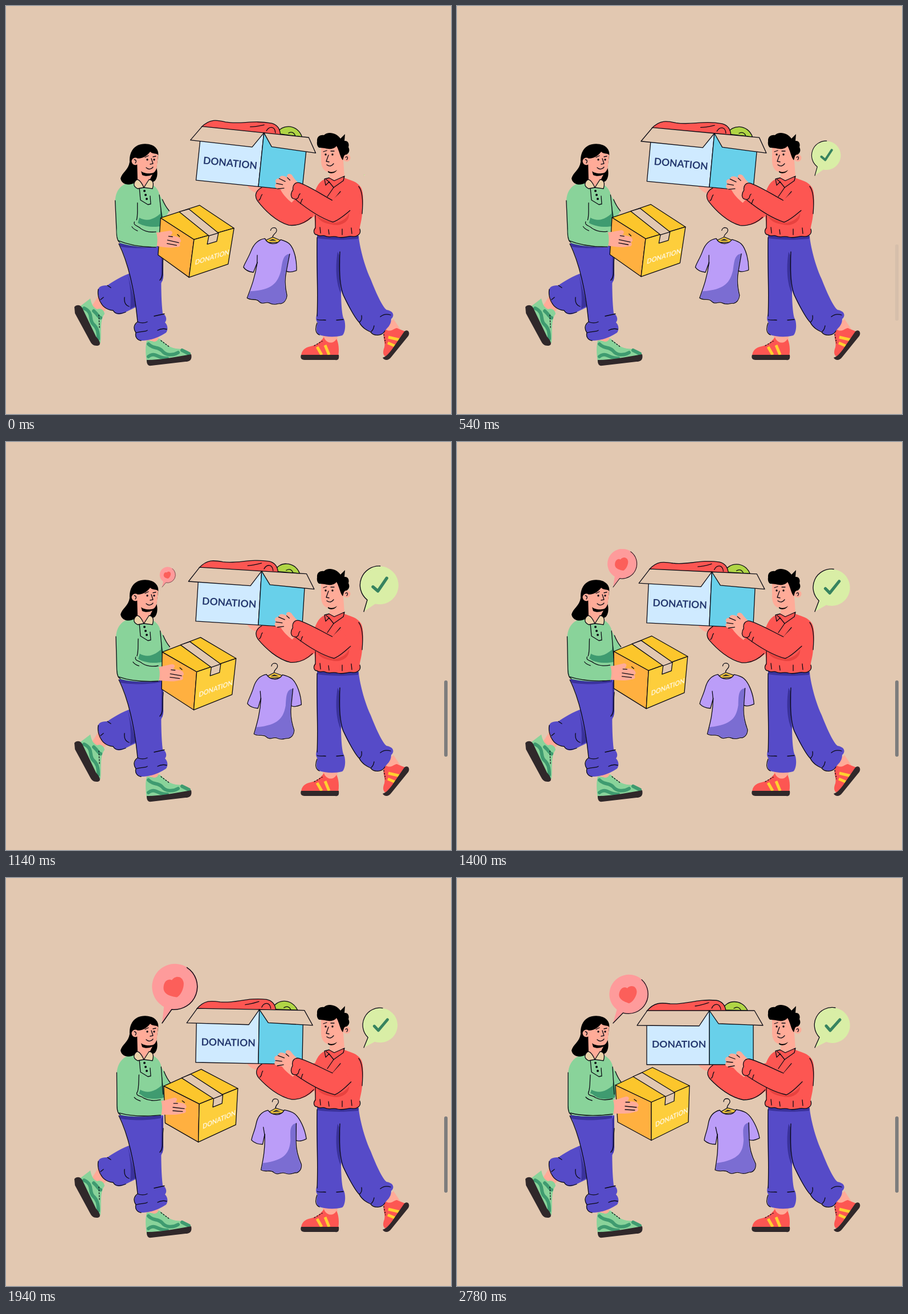
Animation, 781 px wide and 717 px high, one loop 2880 ms. Source, as an HTML page:

```html
<!DOCTYPE html>
<html lang="en">
<head>
<meta charset="utf-8">
<title>Donation</title>
<style>
html, body { margin: 0; width: 100%; height: 100%; overflow: hidden; background: #e2c8b1; }
svg { display: block; width: 781px; height: 717px; }
path, line { stroke-linecap: round; stroke-linejoin: round; }
.ink { fill: none; stroke: #0b0b14; stroke-width: 1.3; }
.edge { stroke: #0b0b14; stroke-width: 1.3; }
.skin { fill: #ffab98; }
.green { fill: #89d39a; }
.shade { fill: #3f9b70; }
.red { fill: #fd5652; }
.pants { fill: #564bc8; }
.navy { fill: #3a329c; }
.sole { fill: #30282a; }
.tan { fill: #e2c8b1; }
.band { fill: none; stroke: #3f9b70; stroke-width: 6; }
.stripe { fill: none; stroke: #ffd02f; stroke-width: 5; stroke-linecap: butt; }
text { font-family: Lato, "Open Sans", sans-serif; font-weight: 700; }
</style>
</head>
<body>
<svg viewBox="0 0 781 717">
  <!-- woman: legs and shoes -->
  <path class="skin" d="M163 508L176 533 162 546 149 530ZM246 580L267 577 269 602 247 602Z"/>
  <path class="green" d="M131 527L148 514C150 524 153 530 160 533 166 530 172 534 173 541 164 552 168 575 166 592L157 590Z"/>
  <path class="band" d="M137 531C154 539 145 551 153 559 160 565 162 572 162 585M154 536C162 543 162 547 166 548"/>
  <path class="sole" d="M120 529C124 524 131 525 134 531L158 581C166 590 168 597 159 597 153 597 150 594 147 588L121 540Z"/>
  <path class="green" d="M247 588C254 585 262 596 268 584 276 588 284 600 298 602 314 603 324 606 325 616L247 626C245 612 244 600 247 588Z"/>
  <path class="band" d="M250 594C258 603 267 598 274 606 280 614 292 615 302 609M250 616C261 607 268 620 283 619M309 605L321 611"/>
  <path class="sole" d="M247 622C275 622 300 616 325 612 327 621 323 625 315 625L255 632C248 633 247 628 247 622Z"/>
  <path class="ink" stroke-dasharray="2 3" d="M272 588L288 600M163 543L164 565"/>
  <path class="pants" d="M222 468C204 474 186 485 178 491 166 490 159 495 162 506 163 514 166 520 168 524 172 532 184 535 188 535 192 544 202 543 210 538 226 530 240 525 252 508 268 494 278 485 276 470L276 417 230 420Z"/>
  <path class="navy" d="M214 472L228 527 218 532C220 512 218 492 214 472ZM270 428C266 456 268 480 274 484L276 470 276 417Z"/>
  <path class="pants" d="M198 417L272 416C274 440 270 500 275 540 283 545 282 553 279 556 285 562 284 570 281 574 268 583 250 589 236 588 228 586 226 580 228 575 223 567 225 560 231 556 226 510 216 450 198 417Z"/>
  <path class="ink" d="M198 418C214 450 226 500 231 555C224 560 223 567 228 574 226 581 230 587 237 588M231 555C238 558 244 557 248 555M260 545L278 541M229 574C238 571 244 573 248 570M266 570C273 566 278 567 282 568M162 498C160 508 164 519 168 524 173 532 183 535 188 535 192 543 202 541 210 538M178 491L184 495M208 512C207 520 210 526 216 528M276 440C273 468 278 471 270 482M166 516L171 512"/>
  <path class="navy" d="M198 417L272 416 272 422C245 427 218 426 201 423Z"/>

  <!-- woman: torso and head -->
  <g id="torso">
    <path class="green" d="M262 318C273 325 279 346 289 360L274 386Z"/>
    <path class="ink" d="M278 340C281 348 285 355 289 360"/>
    <path class="green" d="M226 309C206 313 196 324 195 345L194 398C194 410 196 416 205 417 225 420 250 419 274 417L277 386 273 330C271 320 263 314 256 310Z"/>
    <path class="shade" d="M236 372C248 379 260 376 273 365L275 350C275 365 280 376 277 386 262 390 243 388 233 381Z"/>
    <path class="ink" d="M273 332L276 380M234 346C233 358 234 368 231 376M195 342L195 400C195 409 197 415 201 416"/>
  </g>
  <path class="ink" d="M234 319L236 341 249 349 254 348 253 334"/>
  <path fill="#000" d="M267 264C270 246 251 240 237 243 222 246 216 260 217 274 215 288 204 292 201 303 203 314 216 317 227 310L258 309C266 307 267 292 264 284Z"/>
  <circle class="skin" cx="227" cy="273" r="6.5"/>
  <path class="skin" d="M230 268C244 268 250 260 253 256 258 261 265 258 267 262L265 280C264 290 260 294 254 294 247 295 240 293 237 290L239 297C245 300 252 299 257 296L252 306 241 319 231 308Z"/>
  <path class="edge" fill="#ebd2aa" d="M226 309C230 301 236 306 242 319L231 321C225 318 223 314 226 309ZM242 319L251 305C258 305 260 312 257 321Z"/>
  <path class="ink" d="M225 270C229 270 229 274 227 276M244 266L250 263M258 265L263 264M255 268L258 277 253 278M246 284C250 288 255 287 258 283"/>
  <g fill="#0b0b14"><circle cx="248" cy="270" r="1.7"/><circle cx="260" cy="270" r="1.7"/><circle cx="243" cy="325" r="2"/><circle cx="245" cy="332" r="2"/><circle cx="247" cy="339" r="2"/></g>

  <!-- yellow box -->
  <g id="parcel">
    <path class="edge" fill="#fcc62c" d="M343 333L408 365 341 394 278 364Z"/>
    <path class="edge" fill="#ffb040" d="M278 364L341 394 341 461 282 429Z"/>
    <path class="edge" fill="#fdce3c" d="M341 394L408 365 406 429 341 461Z"/>
    <path class="edge tan" d="M309 349L325 342 382 377 381 392 365 399 366 384Z"/>
    <path class="ink" d="M366 384L382 377"/>
    <text transform="matrix(.85 -.39 0 1 348 438)" font-size="12.4" fill="#fff6dc">DONATION</text>
    <path class="skin" d="M270 391C280 390 289 386 297 384 303 384 303 389 299 392 306 393 312 392 316 395 320 399 319 402 316 403 320 407 318 411 312 411 302 415 290 414 270 414Z"/>
    <path class="ink" d="M296 394L303 394M295 401L315 403M295 407L312 408M311 389L315 392"/>
  </g>
  <g id="forearm">
    <path class="green" d="M199 385C210 377 231 375 238 380 248 389 262 391 273 388 277 396 276 407 274 415 250 419 220 420 204 417 196 410 195 395 199 385Z"/>
    <path class="ink" d="M231 376C228 383 239 382 243 386 253 391 265 390 273 388M226 385C229 389 233 390 237 391M199 413C215 417 242 419 273 415"/>
  </g>

  <!-- blue box and far arm -->
  <g id="crate">
    <path class="skin" d="M423 328C430 338 440 340 448 341L456 327Z"/>
    <path class="red" d="M449 328C438 336 438 346 444 353 458 368 480 386 503 390 522 390 534 382 545 370L548 324 520 330Z"/>
    <path class="skin" d="M482 329L520 329 504 350C495 344 488 338 482 329Z"/>
    <path class="ink" d="M449 329C438 336 438 346 444 353 458 368 480 386 503 390 520 390 532 382 541 372M446 352C450 350 448 345 451 341"/>
    <path class="edge" fill="#b0d545" d="M466 232C471 214 500 211 510 233Z"/>
    <path class="ink" d="M486 229C492 225 496 228 498 232"/>
    <path class="edge red" d="M333 234C346 218 358 219 374 221 402 223 420 212 455 215 467 217 471 226 472 234Z"/>
    <path class="ink" d="M447 229C451 220 461 219 463 231M418 225C428 224 436 221 442 219"/>
    <path class="edge" fill="#cfeaff" d="M333 250L443 233 443 328 333 328Z"/>
    <path class="edge" fill="#68d0ea" d="M443 233L520 250 520 328 443 328Z"/>
    <path class="edge tan" d="M334 233L443 233 425 260 316 259ZM443 233L522 233 537 259 459 256Z"/>
    <text x="342" y="298" font-size="17.5" fill="#24386e">DONATION</text>
  </g>

  <!-- man: legs and shoes -->
  <path class="skin" d="M556 576L582 576 581 600 556 596ZM663 566L680 550 692 568 670 582Z"/>
  <path class="red" d="M558 582C552 590 545 596 535 598 524 600 518 606 518 616L583 616C585 605 584 592 580 585 574 596 561 592 558 582ZM666 568C676 576 684 562 688 567L701 572C696 590 682 605 672 616 662 618 660 610 664 600 667 590 658 580 666 568Z"/>
  <path class="stripe" d="M546 599L554 613M560 596L567 613M671 582L692 587M670 592L684 598"/>
  <path class="ink" stroke-dasharray="2 3" d="M541 597L555 589M663 577L666 592"/>
  <path class="sole" d="M518 613L584 613C585 620 583 623 578 622L524 622C518 622 516 618 518 613ZM699 572C705 567 710 574 706 580L676 617C671 624 664 623 661 618 668 616 672 610 677 604Z"/>
  <path class="pants" d="M546 403L619 404C619 412 626 450 640 480 653 513 662 530 668 534 681 536 682 545 676 550 676 562 668 566 665 571 660 580 645 580 640 572 632 570 622 562 620 556 606 540 594 515 588 500 588 525 590 542 592 548 597 555 596 575 590 579 575 583 560 581 550 578 543 574 544 564 547 557 542 550 545 545 546 540 547 500 544 450 546 403Z"/>
  <path class="navy" d="M582 432C577 462 580 490 588 506 584 480 588 462 586 440ZM546 403L619 404 618 409C590 412 566 411 546 408Z"/>
  <path class="ink" d="M546 407C545 455 548 500 546 545M586 432C584 470 586 492 592 508 600 524 610 546 620 556 625 566 634 570 640 573 646 581 660 580 665 571M546 551C552 553 557 551 561 552M580 552L592 551M546 557C542 567 543 575 550 578M620 556C624 553 625 549 624 544M641 572C645 569 645 566 646 562M657 546C663 541 669 541 675 543"/>

  <!-- man: torso and head -->
  <path class="red" d="M558 305C548 310 543 320 538 340L543 388C538 394 540 402 546 402 550 406 556 402 560 404 566 408 574 403 582 406 592 409 602 403 608 405 616 406 624 401 621 392 620 388 624 380 625 365 628 340 627 326 623 319 616 308 606 307 594 302Z"/>
  <path fill="#e8423f" d="M546 369C558 376 568 380 578 381 592 379 600 370 602 364 604 380 586 388 572 384 560 382 550 379 546 369Z"/>
  <path class="ink" d="M543 368L543 390C538 396 541 402 546 402 550 406 556 402 560 404 566 408 574 403 582 406 592 409 602 403 608 405 616 406 624 401 621 392M551 389L552 399M566 393L567 401M590 392L590 402M606 390L607 400M619 317C626 326 627 342 625 365"/>
  <path class="skin" d="M553 248L553 274C554 286 560 292 569 292L567 303 575 318 594 300 592 272 584 244Z"/>
  <circle class="skin" cx="598" cy="267" r="6.5"/>
  <path d="M565 290C570 293 577 292 581 288 577 295 569 295 565 292Z"/>
  <path d="M551 249C547 249 545 243 546 238 545 229 552 226 558 227 564 220 580 222 587 233L595 225 594 237C600 236 603 242 601 248 604 254 602 258 598 261 592 261 593 267 591 271 586 265 585 254 580 246 576 252 566 252 560 250Z"/>
  <path class="edge red" d="M559 304L561 315 567 309 575 319 592 307 594 299 576 307 567 302Z"/>
  <path class="ink" d="M567 309L562 305M575 319L564 335M587 326L574 342M557 256L563 254M570 255L576 255M566 262L562 273 567 274M563 279C568 283 572 281 575 277M596 266C599 263 601 267 598 270"/>
  <g fill="#0b0b14"><circle cx="561" cy="261" r="1.7"/><circle cx="573" cy="261" r="1.7"/></g>
  <g id="arm">
    <path class="skin" d="M508 346C495 339 488 332 476 332 470 331 470 325 473 323 469 319 471 314 477 314 477 308 484 307 491 311 488 305 494 302 499 306 503 311 507 316 513 319Z"/>
    <path class="ink" d="M473 323L484 324M477 314L488 318M491 311L496 315M476 332L487 330"/>
    <path class="red" d="M513 318C505 317 501 324 503 331 498 340 501 348 508 347 530 362 555 376 578 381 592 379 604 368 606 358L588 326 573 343C552 334 530 322 513 318Z"/>
    <path class="ink" d="M573 343C552 334 530 322 513 318 505 317 501 324 503 331 498 340 501 348 508 347 530 362 555 376 578 381 588 377 598 366 606 358M510 347C516 345 512 340 516 337M518 354C520 351 519 348 521 346"/>
  </g>

  <!-- hanging shirt -->
  <g id="shirt">
    <path class="ink" d="M468 393C468 386 479 386 479 393 479 398 474 397 474 405"/>
    <path fill="none" stroke="#23212e" stroke-width="5" d="M463 413L475 406 489 410Z"/>
    <path fill="none" stroke="#eec33c" stroke-width="2.5" d="M463 413L475 406 489 410Z"/>
    <path class="edge" fill="#bb9df8" d="M461 408C449 411 443 420 441 432 439 445 434 455 434 461 440 467 447 468 454 468L457 450C459 478 456 494 453 513 462 518 469 511 476 517 484 523 488 515 496 518 506 522 510 516 516 517 522 515 525 509 524 502 517 488 513 474 513 460 520 463 527 459 531 457 528 440 518 420 508 413 502 409 496 408 490 407 484 419 468 417 461 408Z"/>
    <path fill="#7b6dd2" d="M512 430C500 432 502 445 503 460 502 481 496 495 456 501L454 512C462 517 469 510 476 516 484 522 488 514 496 517 506 521 510 515 516 516 522 514 524 509 523 502 516 488 512 474 512 460Z"/>
    <path class="ink" d="M454 438L457 452M512 430L513 460"/>
  </g>

  <!-- speech bubbles, drawn around their tail tips -->
  <g id="approve">
    <path fill="#d9eea6" d="M0 0L8 -18A31 31 0 1 1 20 -10Z"/>
    <path class="ink" d="M0 0L8 -18A31 31 0 0 1 36 -70"/>
    <path fill="none" stroke="#37835f" stroke-width="5" d="M20 -38L27 -30 44 -49"/>
  </g>
  <g id="love">
    <path fill="#fe9b9b" d="M0 0L7 -24A35 35 0 1 1 18 -18Z"/>
    <path class="ink" d="M52 -77A35 35 0 0 1 18 -18L0 0"/>
    <path fill="#fc5f5a" d="M26 -62C31 -68 43 -67 43 -55 42 -45 34 -36 29 -35 20 -38 8 -43 12 -55 15 -64 22 -65 26 -62Z"/>
  </g>
  <path id="scrollbar" fill="none" stroke="#7d7d7d" stroke-width="6" d="M772 422V550"/>
</svg>
<script>
const LOOP = 2880, LAST = 59, SWING_STEPS = 57;
// Bubble pop: step, scale, tilt.
const POP = [[0, .03, -4], [5, .4, -5], [17, 1.14, -11], [25, 1.08, -7.5], [35, 1, 0], [47, .97, -4], [59, 1, 0]];
const clamp = (v, lo, hi) => Math.min(hi, Math.max(lo, v));
const place = (id, transform) => document.getElementById(id).setAttribute('transform', transform);

// Steps last 20, 100 and 20 ms in turn.
function stepAt(ms) {
  const rest = ms % 140;
  return Math.min(LAST, 3 * Math.floor(ms / 140) + (rest < 20 ? 0 : rest < 120 ? 1 : 2));
}

// Smooth curve through one column of POP.
function sample(n, column) {
  const at = i => POP[clamp(i, 0, POP.length - 1)];
  const i = n >= LAST ? POP.length - 2 : POP.findIndex(key => key[0] > n) - 1;
  const slope = k => (at(k + 1)[column] - at(k - 1)[column]) / (at(k + 1)[0] - at(k - 1)[0]);
  const span = at(i + 1)[0] - at(i)[0], u = (n - at(i)[0]) / span, v = 1 - u;
  return v * v * (1 + 2 * u) * at(i)[column] + u * u * (3 - 2 * u) * at(i + 1)[column]
    + span * u * v * (v * slope(i) - u * slope(i + 1));
}

function bubble(id, x, y, n) {
  place(id, `translate(${x} ${y}) ` + (n < 0 ? 'scale(0)' : `rotate(${sample(n, 2)}) scale(${sample(n, 1)})`));
}

function draw(ms) {
  const n = stepAt(ms);
  const swing = (1 + Math.cos(Math.PI * Math.min(1, n / SWING_STEPS))) / 2;
  place('crate', `rotate(${5.9 * swing} 546 322)`);
  place('arm', `rotate(${5.5 * swing} 590 335)`);
  place('parcel', `rotate(${7.5 * swing} 210 318)`);
  place('torso', `translate(0 415) skewX(${2.7 * swing}) translate(0 -415)`);
  place('forearm', `translate(${205 - 3 * swing} 400) matrix(${1 - .1 * swing} ${.13 * swing} 0 1 0 0) translate(-205 -400)`);
  place('shirt', `translate(${474 - 3 * swing} ${389 + 2 * swing}) matrix(${1 - .05 * swing} ${.1 * swing} ${-.225 * swing} 1 0 0) translate(-474 -389)`);
  bubble('approve', 628, 298, n);
  bubble('love', 274, 255, n - 20);
  document.getElementById('scrollbar').setAttribute('opacity', clamp((n - 4) / 20, 0, 1) ** 2);
}

const start = performance.now();
function tick() {
  draw((performance.now() - start) % LOOP);
  requestAnimationFrame(tick);
}
tick();
</script>
</body>
</html>
```
